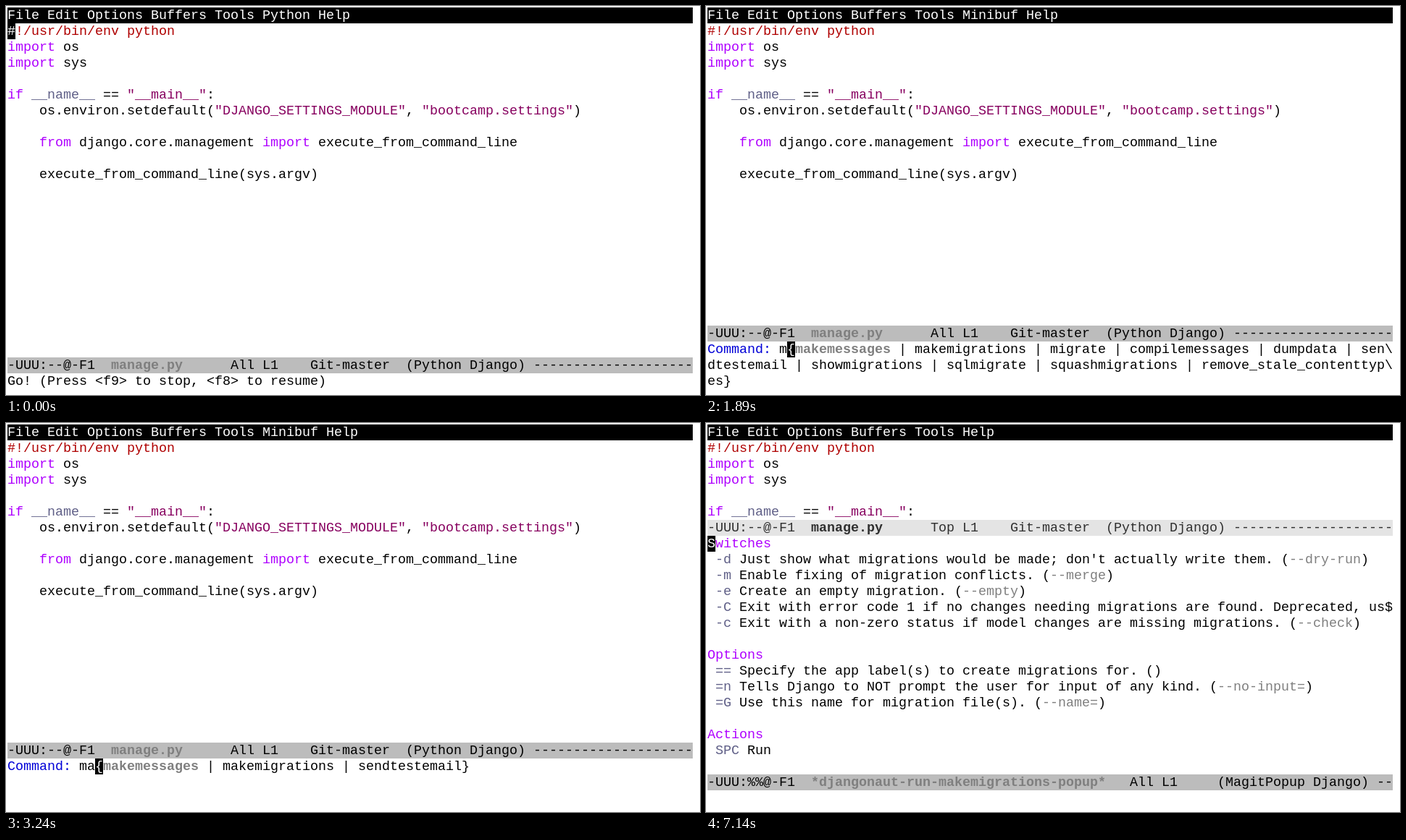
Write an HTML page with a canvas that moves like this. It is 958 by 538 pixels and loops after 8000 ms.

```html
<!DOCTYPE html>
<html lang="en">
<head>
<meta charset="utf-8">
<title>Terminal editor</title>
<style>
  html, body { margin: 0; width: 100%; height: 100%; overflow: hidden; background: #fff; }
  canvas { display: block; }
</style>
</head>
<body>
<canvas id="screen" width="958" height="538"></canvas>
<script>
const ctx = document.getElementById('screen').getContext('2d');
const CELL_W = 11, CELL_H = 22, LEFT = 2, TOP = 2, BASELINE = 16, COLS = 86;
const FONT = '18.33px "Liberation Mono", monospace';
const LOOP = 8000;

// "~x" inside a line switches to style x.
const STYLES = {
  d: '#000000', // default
  w: '#ffffff', // menu
  k: '#af00ff', // keyword
  c: '#af0000', // comment
  s: '#87005f', // string
  n: '#5f5f87', // builtin
  p: '#0000d7', // prompt
  g: '#7f7f7f', // dimmed
  b: '#7f7f7f', // bold, active
  i: '#303030', // inactive mode line
  j: '#303030'  // bold, inactive
};
const BOLD = 'bj';

const CODE = [
  '~c#!/usr/bin/env python',
  '~kimport~d os',
  '~kimport~d sys',
  '',
  '~kif ~n__name__~d == ~s"__main__"~d:',
  '    os.environ.setdefault(~s"DJANGO_SETTINGS_MODULE"~d, ~s"bootcamp.settings"~d)',
  '',
  '    ~kfrom~d django.core.management ~kimport~d execute_from_command_line',
  '',
  '    execute_from_command_line(sys.argv)'
];

const POPUP = [
  '~kSwitches',
  " ~n-d~d Just show what migrations would be made; don't actually write them. (~g--dry-run~d)",
  ' ~n-m~d Enable fixing of migration conflicts. (~g--merge~d)',
  ' ~n-e~d Create an empty migration. (~g--empty~d)',
  ' ~n-C~d Exit with error code 1 if no changes needing migrations are found. Deprecated, us$',
  ' ~n-c~d Exit with a non-zero status if model changes are missing migrations. (~g--check~d)',
  '',
  '~kOptions',
  ' ~n==~d Specify the app label(s) to create migrations for. ()',
  ' ~n=n~d Tells Django to NOT prompt the user for input of any kind. (~g--no-input=~d)',
  ' ~n=G~d Use this name for migration file(s). (~g--name=~d)',
  '',
  '~kActions',
  ' ~nSPC~d Run'
];

const fileMode = (pos, plain = 'd', bold = 'b') =>
  `~${plain}-UUU:--@-F1  ~${bold}manage.py~${plain}      ${pos} L1    Git-master  (Python Django) ` +
  '-'.repeat(20);
const POPUP_MODE =
  '-UUU:%%@-F1  ~b*djangonaut-run-makemigrations-popup*~d   All L1     (MagitPopup Django) --';

const SCENES = [
  { at: 0, menu: 'Python ', cursor: [0, 1], modeRow: 22,
    mini: ['Go! (Press <f9> to stop, <f8> to resume)'] },
  { at: 500, menu: 'Python ', cursor: [0, 1], modeRow: 22,
    mini: ['C-u C-c r-'] },
  { at: 1890, menu: 'Minibuf ', cursor: [10, 21], modeRow: 20,
    mini: [
      '~pCommand: ~dm{~bmakemessages~d | makemigrations | migrate | compilemessages | dumpdata | sen\\',
      'dtestemail | showmigrations | sqlmigrate | squashmigrations | remove_stale_contenttyp\\',
      'es}'
    ] },
  { at: 3240, menu: 'Minibuf ', cursor: [11, 21], modeRow: 20,
    mini: ['~pCommand: ~dma{~bmakemessages~d | makemigrations | sendtestemail}'] },
  { at: 4270, menu: 'Minibuf ', cursor: [0, 21], modeRow: 20,
    mini: ['~pCommand: ~dma{~bmakemigrations~d | sendtestemail | makemessages}'] },
  { at: 7140, menu: '', cursor: [0, 7], popup: true }
];

function fillCells(col, row, count, color) {
  ctx.fillStyle = color;
  ctx.fillRect(LEFT + col * CELL_W, TOP + row * CELL_H, count * CELL_W, CELL_H);
}

function drawLine(text, row, cursor) {
  let style = 'd', col = 0;
  for (let i = 0; i < text.length; i++) {
    if (text[i] === '~') {
      style = text[++i];
      continue;
    }
    const atCursor = cursor[0] === col && cursor[1] === row;
    if (atCursor) fillCells(col, row, 1, '#000');
    ctx.fillStyle = atCursor ? '#fff' : STYLES[style];
    ctx.font = (BOLD.includes(style) ? 'bold ' : '') + FONT;
    ctx.fillText(text[i], LEFT + col * CELL_W, TOP + row * CELL_H + BASELINE);
    col++;
  }
}

function drawScene({ menu, cursor, modeRow, mini, popup }) {
  const line = (text, row) => drawLine(text, row, cursor);
  const lines = (list, row) => list.forEach((text, i) => line(text, row + i));
  const bar = (text, row, color) => {
    fillCells(0, row, COLS, color);
    line(text, row);
  };

  ctx.fillStyle = '#fff';
  ctx.fillRect(0, 0, 958, 538);
  bar(`~wFile Edit Options Buffers Tools ${menu}Help`, 0, '#000');
  if (popup) {
    lines(CODE.slice(0, 5), 1);
    bar(fileMode('Top', 'i', 'j'), 6, '#e4e4e4');
    lines(POPUP, 7);
    bar(POPUP_MODE, 22, '#bcbcbc');
  } else {
    lines(CODE, 1);
    bar(fileMode('All'), modeRow, '#bcbcbc');
    lines(mini, modeRow + 1);
  }
}

let shown = null;
function tick() {
  const t = performance.now() % LOOP;
  const scene = SCENES.findLast(s => s.at <= t);
  if (scene !== shown) drawScene(shown = scene);
  requestAnimationFrame(tick);
}
tick();
</script>
</body>
</html>
```
